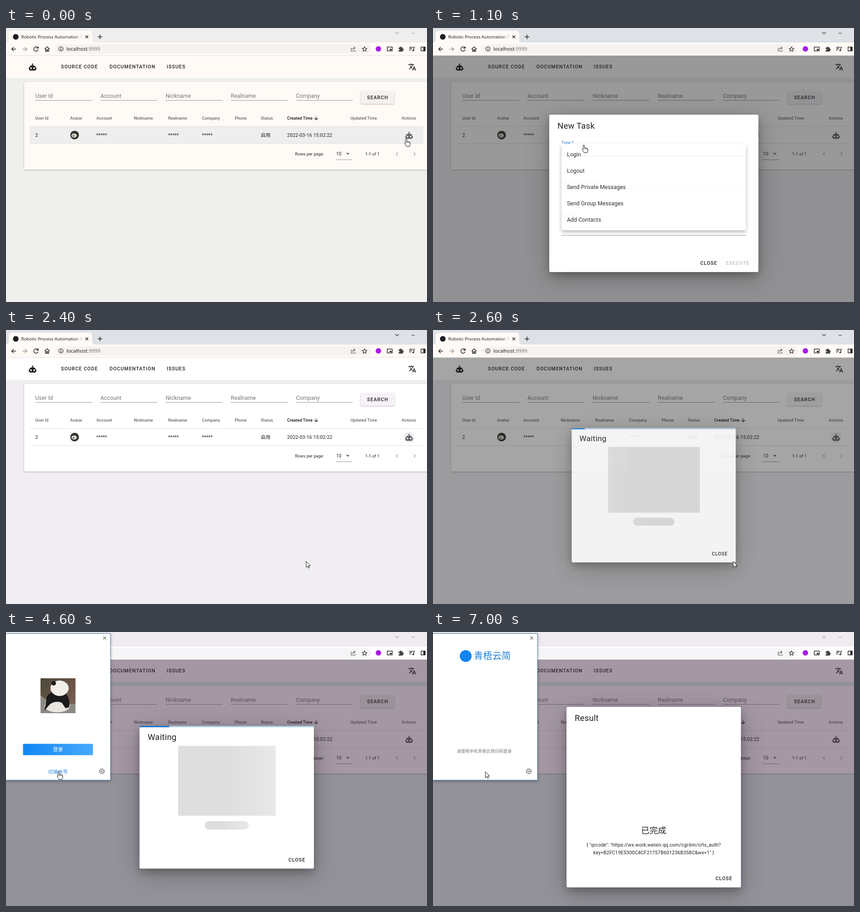
These frames come from a looping animation (927 by 604 pixels, 8200 ms). An HTML page:

```html
<!DOCTYPE html>
<html lang="en">
<head>
<meta charset="utf-8">
<title>Task console</title>
<style>
html, body { margin: 0; width: 100%; height: 100%; overflow: hidden; }
svg { display: block; }
text { font-family: Roboto, "Noto Sans CJK SC", "Noto Sans CJK", sans-serif; letter-spacing: .07px; fill: #222; white-space: pre; }
.ui { font-family: "Noto Sans", "Open Sans", sans-serif; letter-spacing: 0; }
.title { font-size: 18.5px; letter-spacing: .23px; }
.btn { font-weight: 500; font-size: 10.75px; letter-spacing: .96px; }
.head { font-weight: 500; fill: #666; }
.dim { fill: #757575; }
.mid { text-anchor: middle; }
.line { fill: none; stroke: #222; stroke-width: 1.4; }
.thin { stroke-width: 1.1; }
.rule { stroke: #949494; }
.dialog { fill: #fff; filter: drop-shadow(0 7px 9px rgba(0,0,0,.24)) drop-shadow(0 12px 26px rgba(0,0,0,.24)); }
.lift { filter: drop-shadow(0 1.5px 1.5px rgba(0,0,0,.28)); }
#strip { fill: var(--strip); }
.bar { fill: var(--bar); }
.paper { fill: var(--paper); }
#bg { fill: var(--bg); }
</style>
</head>
<body>
<svg id="stage" width="927" height="604" viewBox="0 0 927 604"></svg>
<script>
const LOOP = 8200, STEP = 100;
const stage = document.getElementById('stage');
const $ = id => document.getElementById(id);

const text = (x, y, size, str, cls = '', more = '') =>
  `<text x="${x}" y="${y}" font-size="${size}" class="${cls}" ${more}>${str}</text>`;
const rect = (x, y, w, h, fill, more = '') =>
  `<rect x="${x}" y="${y}" width="${w}" height="${h}" ${fill ? `fill="${fill}"` : ''} ${more}/>`;
const path = (d, more = 'class="line"') => `<path d="${d}" ${more}/>`;
const circle = (x, y, r, more) => `<circle cx="${x}" cy="${y}" r="${r}" ${more}/>`;
const ellipse = (x, y, rx, ry, fill) => `<ellipse cx="${x}" cy="${y}" rx="${rx}" ry="${ry}" fill="${fill}"/>`;
const icon = (d, x, y, fill) =>
  path(d, `transform="translate(${x} ${y}) scale(.768) translate(-12 -12)" fill="${fill}" fill-rule="evenodd"`);
const rule = (x1, x2, y) => path(`M${x1} ${y}H${x2}`, 'class="rule"');
const caret = (x, y, fill = '#666') => path(`M${x - 4} ${y - 2}h8l-4 4z`, `fill="${fill}"`);

const ROBOT = 'M12 2a2 2 0 0 1 1 3.7V7h1a7 7 0 0 1 7 7h1a1 1 0 0 1 1 1v3a1 1 0 0 1-1 1h-1v1a2 2 0 0 1-2 2H5a2 2 0 0 1-2-2v-1H2a1 1 0 0 1-1-1v-3a1 1 0 0 1 1-1h1a7 7 0 0 1 7-7h1V5.7A2 2 0 0 1 12 2M7.5 13a2.5 2.5 0 1 0 0 5 2.5 2.5 0 1 0 0-5m9 0a2.5 2.5 0 1 0 0 5 2.5 2.5 0 1 0 0-5z';
const TRANSLATE = 'M12.9 15.1l-2.6-2.6A17.5 17.5 0 0 0 14.1 6H17V4h-7V2H8v2H1v2h11.2Q11.2 9 9 11.3 7.6 9.8 6.7 8h-2q1.1 2.5 3 4.6l-5.1 5L4 19l5-5 3.1 3.1zM18.5 10h-2L12 22h2l1.1-3h4.8l1.1 3h2zm-2.6 7l1.6-4.3 1.6 4.3z';
const STAR = 'M0-5.2L1.5-1.7 5.2-1.4 2.4 1 3.3 4.7 0 2.7-3.3 4.7-2.4 1-5.2-1.4-1.5-1.7z';

function browser() {
  return rect(0, 0, 927, 33, '', 'id="strip"') +
    path('M0 32q6 0 6-6v-12q0-8 8-8h168q8 0 8 8v12q0 6 6 6z', 'class="bar"') +
    rect(0, 32, 927, 29, '', 'class="bar"') +
    circle(21.5, 19.5, 6.2, 'fill="#1b1f23"') +
    text(33.5, 23, 9.6, 'Robotic Process Automation T', 'ui', 'mask="url(#fade)"') +
    path('M175 16.5l6 6m0-6l-6 6M202 19.5h10m-5-5v10') +
    path('M857 9l4 4 4-4M893 11.5h7', 'id="sys" class="line thin"') +
    rect(107, 36, 696, 20, '', 'id="pill" rx="10"') +
    path('M22 46.5H12.5m4.5-4.5l-4.5 4.5 4.5 4.5') +
    path('M36.5 46.5H46m-4.5-4.5l4.5 4.5-4.5 4.5', 'class="line" style="stroke:#9a9a9a"') +
    path('M70 43.5a4.8 4.8 0 1 0 .8 4M71 40.5v4h-4') +
    path('M85 46.5l5.5-5 5.5 5M87 45.5v6h2.5v-4h2v4H94v-6') +
    circle(121, 46, 4.8, 'class="line thin"') + path('M121 45v4M121 42.8V44') +
    text(133, 50, 11, 'localhost<tspan fill="#777">:9999</tspan>', 'ui') +
    path('M762.5 44.5H760V51h9v-2.5M763 48.5q.5-4.5 5-4.5m-2.5-2.8l3.2 2.8-3.2 2.8', 'class="line thin" style="stroke:#555"') +
    path(STAR, 'class="line thin" transform="translate(789.5 46.5)"') +
    circle(820, 46, 6, 'fill="#a61ce8"') +
    rect(839.5, 42, 11, 8.5, 'none', 'class="line"') + rect(845, 46, 4, 3, '#222') +
    path('M864.5 43h3a1.7 1.7 0 1 1 3.3 0h3v3.2a1.7 1.7 0 1 1 0 3.3V52h-9.3v-2.8a1.7 1.7 0 1 0 0-3.2z', 'fill="#444"') +
    path('M888 42.5h8M888 45.5h6M888 48.5h3M898 49.5v-7h2.5') + circle(896.5, 49.5, 1.7, 'fill="#222"') +
    rect(914, 42, 9, 8.5, 'none', 'class="line"') + rect(919, 42, 4, 8.5, '#222') +
    path('M0 60.5H927', 'stroke="#e3e0de"');
}

function page() {
  const fields = ['User Id', 'Account', 'Nickname', 'Realname', 'Company'];
  const heads = { 'User Id': 64, Avatar: 141, Account: 199, Nickname: 281.5, Realname: 357, Company: 431.5,
    Phone: 503.5, Status: 561, 'Updated Time': 758.5, Actions: 871 };
  return rect(0, 61, 927, 543, '', 'id="bg"') +
    rect(0, 61, 927, 49, '', 'class="paper"') +
    icon(ROBOT, 58.5, 86, '#1d1d1d') + icon(TRANSLATE, 894.5, 86, '#222') +
    text(121, 89.3, 10.75, 'SOURCE CODE', 'btn') + text(228, 89.3, 10.75, 'DOCUMENTATION', 'btn') +
    text(354, 89.3, 10.75, 'ISSUES', 'btn') +
    rect(40, 119, 900, 193, '', 'class="paper lift" rx="3"') +
    fields.map((f, i) => {
      const x = 64.5 + i * 143.5;
      return text(x, 153.5, 12.3, f, 'dim') + rule(x, x + 125, 159.5);
    }).join('') +
    rect(781, 139, 74, 28, '', 'id="search" class="lift" rx="3"') +
    text(795, 157, 10.75, 'SEARCH', 'btn') +
    Object.entries(heads).map(([h, x]) => text(x, 202, 9.2, h, 'head')).join('') +
    text(619, 202, 9.2, 'Created Time', 'head', 'style="fill:#111"') +
    path('M683 194.5v8m-4-4l4 4 4-4', 'class="line thin"') +
    rect(52, 217, 867, 37, '#eeeeee', 'id="row"') +
    path('M52 217H919M52 254.5H919', 'stroke="#e2dfdd"') +
    text(64.5, 240, 10.75, '2') +
    [199, 357, 431.5].map(x => text(x, 240, 10.75, '*****')).join('') +
    circle(151, 236, 9.6, 'fill="#34332e"') + ellipse(150, 237, 6, 4.5, '#d8d6cd') + circle(148.5, 238, 1.8, 'fill="#555"') +
    text(561, 240, 10.75, '启用') + text(619, 240, 10.75, '2022-03-16 15:02:22') +
    circle(887.5, 236.5, 12, 'id="halo" fill="#f1ecf3"') + icon(ROBOT, 887.5, 236.5, '#636363') +
    text(636.5, 280.5, 9.2, 'Rows per page:') + text(727, 281, 10, '10') + caret(752.5, 277.5) +
    rule(726, 762, 290.5) + text(791, 280.5, 9.2, '1-1 of 1') +
    path('M863 273.5l-4 4 4 4M897.5 273.5l4 4-4 4', 'class="line" style="stroke:#aaa"');
}

function taskDialog() {
  const items = ['Login', 'Logout', 'Send Private Messages', 'Send Group Messages', 'Add Contacts'];
  return rect(256, 191, 460.5, 347, '', 'class="dialog" rx="3"') +
    text(274, 221.5, 18.5, 'New Task', 'title') +
    `<g id="typeIdle">${text(283, 272.5, 12.3, 'Type *', 'dim')}${rule(283, 689, 281.5)}${caret(679, 269)}</g>` +
    `<g id="typeFocus">${text(283, 255.8, 9.2, 'Type *', '', 'style="fill:#1976d2"')}${rect(283, 280.3, 406, 1.7, '#1976d2')}${caret(679, 269, '#1976d2')}</g>` +
    text(283, 272.8, 12.3, 'Login', '', 'id="value"') +
    text(283, 345.3, 12.3, 'Schedule Time', 'dim') + rule(283, 689, 353.5) +
    text(283, 417, 12.3, 'Data', 'dim') + rule(283, 689, 457) +
    rect(638, 504, 66, 28, '#ececec', 'id="execHover" rx="3"') +
    text(588.5, 521.8, 10.75, 'CLOSE', 'btn') + text(645, 521.8, 10.75, 'EXECUTE', 'btn', 'id="exec"') +
    `<g id="menu">${rect(283, 255.5, 406, 197, '#fff', 'rx="3" style="filter:drop-shadow(0 4px 4px rgba(0,0,0,.3))"')}` +
    rect(283, 261.5, 406, 37, '#eee', 'id="itemHover"') +
    items.map((s, i) => text(295, 284.4 + 37 * i, 12.3, s)).join('') + '</g>';
}

function waitDialog() {
  return rect(294, 207, 384, 314.5, '', 'class="dialog" rx="3"') +
    `<svg x="294" y="207" width="384" height="3">${rect(0, 0, 384, 3, '#b4d2ef')}` +
    rect(0, 0, 0, 3, '#1976d2', 'id="bar1"') + rect(0, 0, 0, 3, '#1976d2', 'id="bar2"') + '</svg>' +
    text(312, 237.5, 18.5, 'Waiting', 'title') +
    rect(379, 251, 215, 154, 'url(#shine)') + rect(437.5, 417, 97, 18.5, 'url(#shine)', 'rx="9.25"') +
    rect(615, 488, 51, 28, '#eeeeee', 'id="closeHover" rx="3"') +
    text(622, 505.8, 10.75, 'CLOSE', 'btn');
}

function resultDialog() {
  return rect(294, 165, 384, 398, '', 'class="dialog" rx="3"') +
    text(312, 195.7, 18.5, 'Result', 'title') + text(486, 444, 18.5, '已完成', 'mid') +
    text(486, 473, 10.75, '{ "qrcode": "https://wx.work.weixin.qq.com/cgi-bin/crtx_auth?', 'mid') +
    text(486, 490, 10.75, 'key=B2FC19E5300C4CF21757B601236B358C&amp;wx=1" }', 'mid') +
    text(622, 547.3, 10.75, 'CLOSE', 'btn');
}

function photo() {
  return `<svg x="76" y="102" width="77" height="77">${rect(0, 0, 77, 77, 'url(#earth)')}` +
    path('M0 38Q14 46 20 58L77 56V77H0z', 'fill="#8d8a86"') +
    ellipse(37, 61, 28, 14, '#e9e6df') +
    path('M13 50Q12 34 28 30L56 34Q66 46 63 64L55 66 47 54Q32 48 20 58L8 72z', 'fill="#1c1b1b"') +
    ellipse(42, 22, 20, 17, '#f1eee8') + circle(29, 11, 5, 'fill="#1c1b1b"') + '</svg>';
}

function client() {
  return rect(-2, 3.5, 232, 323, '#fff', 'stroke="#4a7db5" style="filter:drop-shadow(0 2px 3px rgba(0,0,0,.3))"') +
    path('M214 10l6.5 6.5m0-6.5l-6.5 6.5', 'class="line thin" style="stroke:#666"') +
    circle(211, 307, 4.5, 'class="line thin" style="stroke:#666"') + circle(211, 307, 1.7, 'class="line thin" style="stroke:#666"') +
    circle(211, 307, 5.6, 'fill="none" stroke="#666" stroke-width="1.4" stroke-dasharray="2.2"') +
    `<g id="signIn">${photo()}` +
    rect(37.5, 246.5, 154, 25, 'url(#sky)', 'rx="1.5"') +
    text(114.5, 263.2, 11, '登录', 'mid', 'style="fill:#fff"') +
    text(114.5, 312, 10.75, '切换帐号', 'mid', 'style="fill:#2b80dc"') + '</g>' +
    `<g id="scan">${circle(72, 53, 13, 'fill="#1485ee"')}` +
    text(90, 60.3, 20.3, '青梧云简', '', 'style="fill:#1b7fd6;font-weight:500"') +
    text(113, 266, 9.2, '请使用手机青梧云简扫码登录', 'mid dim') + '</g>';
}

const gradient = (id, stops, more = '') => `<linearGradient id="${id}" ${more}>` +
  stops.map(([o, c]) => `<stop offset="${o}" stop-color="${c}"/>`).join('') + '</linearGradient>';

stage.innerHTML = '<defs>' +
  gradient('shine', [[0, '#dedede'], [.5, '#e9e9e9'], [1, '#dedede']]) +
  gradient('sky', [[0, '#0f86f6'], [1, '#48aafb']]) +
  gradient('earth', [[0, '#4d4a3a'], [.6, '#6e5547'], [1, '#7d6a5e']], 'x2="1" y2="1"') +
  gradient('fadeOut', [[0, '#fff'], [1, '#000']], 'gradientUnits="userSpaceOnUse" x1="152" x2="171"') +
  `<mask id="fade" maskUnits="userSpaceOnUse" x="0" y="0" width="190" height="33">${rect(0, 0, 172, 33, 'url(#fadeOut)')}</mask></defs>` +
  browser() + page() + rect(0, 61, 927, 543, '', 'id="veil"') +
  `<g id="task">${taskDialog()}</g><g id="wait">${waitDialog()}</g><g id="result">${resultDialog()}</g>` +
  `<g id="client">${client()}</g><g id="pointer" fill="#fff" stroke="#111" stroke-linejoin="round">` +
  path('M0 0v13.2l3-2.8 2.2 4.6 2-.9-2.1-4.5h4.1z', 'id="arrow"') +
  `<g id="hand">${path('M-1.5 1.5a1.5 1.5 0 0 1 3 0v5l1-.4a1.4 1.4 0 0 1 2 .8l1-.2a1.4 1.4 0 0 1 1.7.9q1.8-.2 1.8 1.6v3.3L7.4 17H.8l-3.4-5.4q-1.2-2 .2-2.4l.9.8z', '')}` +
  path('M1.5 6.5V9M4.5 7v2M7.2 7.6v2', '') + '</g></g>';

const clamp = v => Math.min(1, Math.max(0, v));
function bezier(x, x1, y1, x2, y2) {
  x = clamp(x);
  const at = (u, a, b) => 3 * (1 - u) ** 2 * u * a + 3 * (1 - u) * u * u * b + u ** 3;
  let lo = 0, hi = 1;
  for (let i = 0; i < 20; i++) {
    const mid = (lo + hi) / 2;
    if (at(mid, x1, x2) < x) lo = mid; else hi = mid;
  }
  return at(lo, y1, y2);
}
const ease = x => bezier(x, .25, .1, .25, 1);
const swift = x => bezier(x, .25, .8, .25, 1);
const within = (t, a, b) => t >= a && t < b;
const show = (id, on) => $(id).style.display = on ? '' : 'none';
const setVar = (name, value) => stage.style.setProperty('--' + name, value);

function pop(id, p, cx, cy) {
  show(id, p > .01);
  $(id).style.opacity = p;
  $(id).setAttribute('transform', `translate(${cx} ${cy}) scale(${.5 + p / 2}) translate(${-cx} ${-cy})`);
}

// left and right are insets in percent of the track
function progress(id, left, right) {
  $(id).setAttribute('x', left * 3.84);
  $(id).setAttribute('width', Math.max(0, 100 - left - right) * 3.84);
}

const route = [[0, 881, 244], [250, 881, 244], [400, 697, 244], [600, 440, 252], [800, 332, 258], [1100, 332, 258],
  [1300, 363, 294], [1600, 363, 294], [1700, 524, 402], [1800, 637, 490], [1900, 661, 510], [3700, 661, 510],
  [4000, 370, 410], [4300, 116, 308], [LOOP, 115, 308]];
const handTimes = [[0, 300], [700, 1650], [1850, 2300], [2700, 3700], [4300, 4700]];

function movePointer(t) {
  const i = route.findIndex(r => r[0] > t);
  const [t0, x0, y0] = route[i - 1], [t1, x1, y1] = route[i], k = (t - t0) / (t1 - t0);
  $('pointer').setAttribute('transform', `translate(${x0 + (x1 - x0) * k} ${y0 + (y1 - y0) * k})`);
  const hand = handTimes.some(([a, b]) => within(t, a, b));
  show('hand', hand);
  show('arrow', !hand);
}

function draw(t) {
  const start = t < 300, late = t >= 3700, idle = t < 100 || late;
  setVar('strip', late ? '#efebf0' : idle ? '#eeeeee' : '#dee1e6');
  setVar('bar', late ? '#fffdff' : '#fffaf5');
  setVar('paper', start ? '#fffaf6' : '#fff');
  setVar('bg', start ? '#efefed' : late ? '#def3ea' : '#f0eef1');
  $('pill').style.fill = late ? '#f5f4f6' : '#f6f2ef';
  $('sys').style.stroke = idle ? '#999' : '#222';
  $('search').style.fill = start ? '#f5f1ef' : late ? '#eaf3ea' : '#f7f2f9';
  show('row', start);
  show('halo', within(t, 2200, 2700));

  const task = swift((t - 277) / 300) * (1 - swift((t - 2130) / 270));
  const wait = swift((t - 2480) / 300);
  $('veil').setAttribute('fill', late ? '#392039' : '#212121');
  $('veil').setAttribute('fill-opacity', .46 * Math.max(task, wait));

  pop('task', task, 486, 364.5);
  const focused = t >= 1000, chosen = t >= 1600;
  show('typeIdle', !focused);
  show('typeFocus', focused);
  show('value', chosen);
  show('execHover', within(t, 1900, 2300));
  $('exec').style.fill = chosen ? '' : '#bdbdbd';
  const open = swift((t - 950) / 300), shut = clamp((t - 1550) / 300);
  show('menu', open > 0 && shut < 1);
  show('itemHover', t >= 1200);
  $('menu').style.opacity = open * (1 - shut);
  $('menu').setAttribute('transform', `translate(0 255.5) scale(1 ${.5 + open / 2}) translate(0 -255.5)`);

  const finished = t >= 6600;
  pop('wait', finished ? 0 : wait, 486, 364);
  show('result', finished);
  show('closeHover', within(t, 2700, 3800));
  const phase = Math.max(0, 680 + (t - 3100) * 1.133) % 2200;
  const short = ease(phase / 1320), long = ease((phase - 1320) / 880);
  progress('bar1', -200 + 307 * short, 100 - 108 * short);
  progress('bar2', -90 + 190 * long, 100 - 135 * long);
  const shift = -1 + 2 * ease(Math.max(0, t - 2420) % 1500 / 1500);
  $('shine').setAttribute('gradientTransform', `translate(${shift} 0)`);

  show('client', t >= 3800);
  show('signIn', t < 4800);
  show('scan', t >= 4800);
  movePointer(t);
}

function tick() {
  const t = performance.now() % LOOP;
  draw(Math.floor(t / STEP) * STEP);
  requestAnimationFrame(tick);
}
tick();
</script>
</body>
</html>
```
